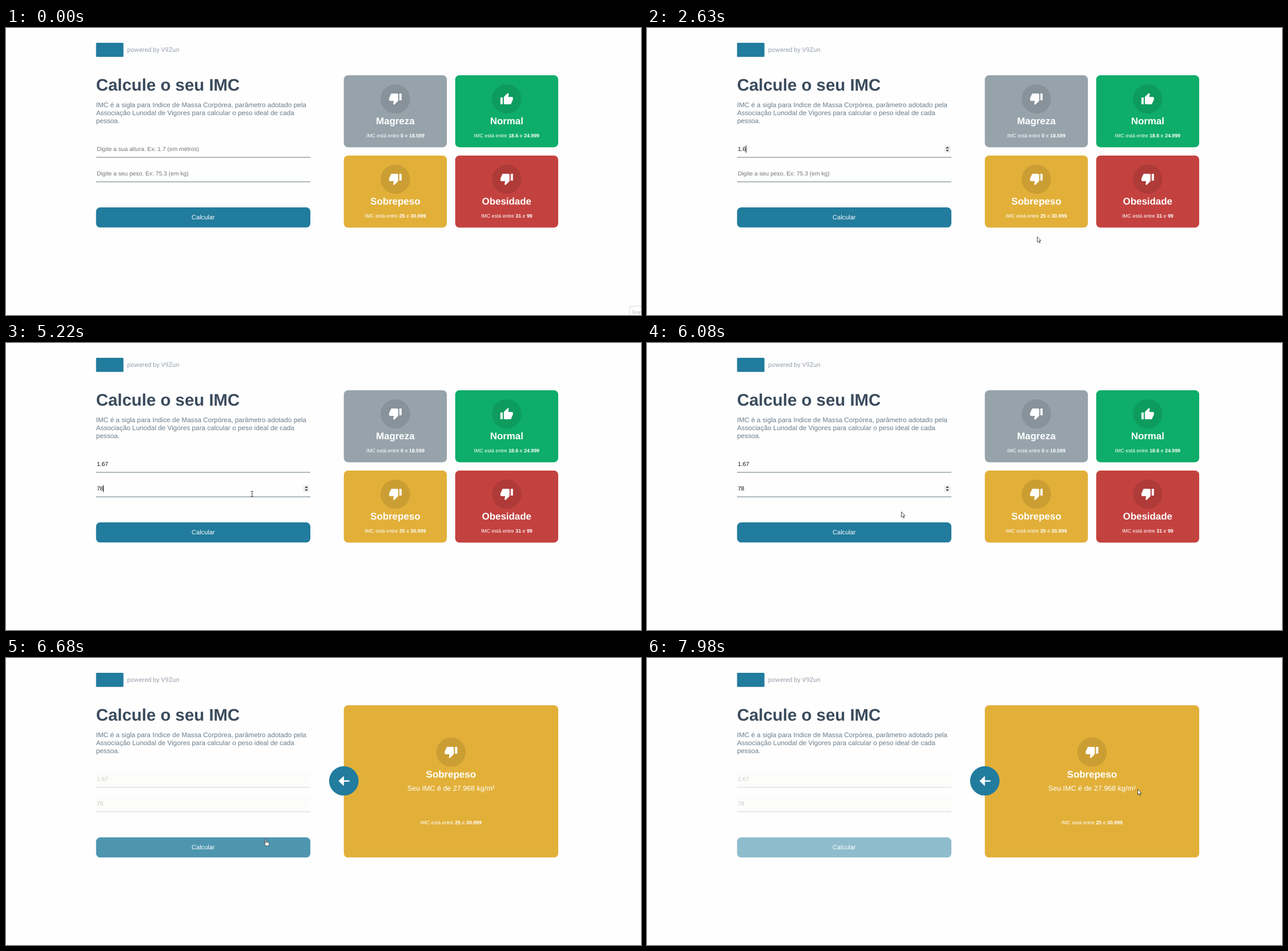
Recreate the animation shown at these times as an HTML page. Size 1112x504 px, loop 8 s.

```html
<!DOCTYPE html>
<html lang="pt">
<head>
<meta charset="utf-8">
<title>Calculadora de IMC</title>
<style>
  html, body { margin: 0; width: 100%; height: 100%; overflow: hidden; background: #fefefe; }
  svg { display: block; width: 100vw; height: 100vh; }
  text { font-family: "Liberation Sans", Arial, sans-serif; text-rendering: geometricPrecision; white-space: pre; }
  .mid { text-anchor: middle; fill: #fff; }
  .name { font-size: 16.92px; font-weight: bold; }
  .range { font-size: 8.83px; }
  .range tspan { font-weight: bold; }
  .para { font-size: 11.77px; fill: #6a7d8b; }
  .value { font-size: 10.3px; }
</style>
</head>
<body>
<svg id="stage" viewBox="0 0 1112 504"></svg>
<script>
const LOOP = 8000, TICK = 69, BLINK = 530;
const $ = id => document.getElementById(id);
const show = (id, on) => $(id).setAttribute('display', on ? 'inline' : 'none');
const set = (id, key, val) => $(id).setAttribute(key, val);

const THUMB = 'M15 3H6c-.83 0-1.54.5-1.84 1.22l-3.02 7.05c-.09.23-.14.47-.14.73v2c0 1.1.9 2 2 2h6.31' +
  'l-.95 4.57-.03.32c0 .41.17.79.44 1.06L9.83 23l6.59-6.59c.36-.36.58-.86.58-1.41V5c0-1.1-.9-2-2-2zm4 0v12h4V3h-4z';

const rangeText = (x, y, lo, hi) =>
  `<text class="mid range" x="${x}" y="${y}">IMC está entre <tspan>${lo}</tspan> e <tspan>${hi}</tspan></text>`;

const badge = (x, y, name, up) => `
  <circle cx="${x}" cy="${y}" r="25.8" fill="#000" fill-opacity=".1"/>
  <path d="${THUMB}" fill="#fff" transform="translate(${x - 12} ${y - 12.5})${up ? ' rotate(180 12 12.5)' : ''}"/>
  <text class="mid name" x="${x}" y="${y + 44.8}">${name}</text>`;

const box = (x, y, w, h, fill) => `<rect x="${x}" y="${y}" width="${w}" height="${h}" rx="7.4" fill="${fill}"/>`;

const card = (x, y, fill, name, lo, hi, up) =>
  box(x, y, 180.4, 126.5, fill) + badge(x + 90.2, y + 41.5, name, up) + rangeText(x + 90.2, y + 109, lo, hi);

const field = (i, y) => `
  <g id="field${i}">
    <rect id="shade${i}" x="157.7" y="${y - 14}" width="375.3" height="28" fill="#efefe6" fill-opacity=".4"/>
    <rect x="157.7" y="${y + 14}" width="375.3" height="1.5" fill="#96a3ab"/>
    <text id="value${i}" class="value" x="158.9" y="${y + 3.8}"></text>
    <rect id="caret${i}" y="${y - 6}" width="1" height="12.5" fill="#111"/>
    <g id="spin${i}">
      <rect x="520.3" y="${y - 6}" width="11.4" height="12.6" fill="#efefef"/>
      <path d="M523 ${y - .9}l3-3.2 3 3.2zM523 ${y + 1.5}l3 3.2 3-3.2z" fill="#444"/>
    </g>
  </g>`;

$('stage').innerHTML = `
  <rect width="1112" height="504" fill="#fefefe"/>
  <rect x="157.7" y="26" width="48" height="24.7" rx="1.5" fill="#227c9d"/>
  <text x="212" y="42.3" fill="#9aa3af" style="font:11.1px Roboto,sans-serif">powered by V9Zun</text>
  <text x="157.7" y="110" fill="#3a4b5c" font-size="29.42" font-weight="bold">Calcule o seu IMC</text>
  <text class="para" x="157.7" y="139.3">IMC é a sigla para Indice de Massa Corpórea, parâmetro adotado pela</text>
  <text class="para" x="157.7" y="152.9">Associação Lunodal de Vigores para calcular o peso ideal de cada</text>
  <text class="para" x="157.7" y="166.5">pessoa.</text>
  ${field(0, 212.4)}${field(1, 255.4)}
  <g id="button">${box(157.7, 315, 375.3, 35.3, '#227c9d')}</g>
  <text class="mid" x="345.3" y="336.2" font-size="11.03">Calcular</text>
  <g id="grid">
    ${card(591.6, 83, '#96a3ab', 'Magreza', '0', '18.599')}
    ${card(786.6, 83, '#0ead69', 'Normal', '18.6', '24.999', true)}
    ${card(591.6, 224, '#e2b039', 'Sobrepeso', '25', '30.999')}
    ${card(786.6, 224, '#c3423f', 'Obesidade', '31', '99')}
  </g>
  <g id="result">
    ${box(591.6, 83, 375.4, 267.3, '#e2b039')}
    ${badge(779.3, 165.4, 'Sobrepeso')}
    <text class="mid" x="779.3" y="233.3" font-size="12.5">Seu IMC é de 27.968 kg/m²</text>
    ${rangeText(779.3, 292, '25', '30.999')}
    <circle cx="591.6" cy="215.8" r="25.8" fill="#227c9d"/>
    <path d="M582.3 216l9.4-9v7.7h9.8v2.6h-9.8v7.7z" fill="#fff"/>
  </g>
  <g id="tip">
    <rect x="1092.5" y="488.5" width="30" height="30" fill="#fff" stroke="#dcdcdc"/>
    <text x="1096" y="502" font-size="8.8" fill="#b0b0b0">Gravar</text>
  </g>
  <g id="cursor">
    <circle id="click" cx="-.5" cy="0" r="9" fill="#e6e600" fill-opacity=".65"/>
    <path id="arrow" d="M.4.6V10l2.2-2 1.6 3.6 1.5-.7-1.6-3.5h2.8z" fill="#fff" stroke="#222" stroke-width=".8"/>
    <path id="beam" d="M-2-4.6h1.5l.5.5.5-.5H2M0-4.4v8.8M-2 4.6h1.5l.5-.5.5.5H2" fill="none" stroke="#222" stroke-width=".9"/>
    <path id="hand" d="M-1 1.2q0-1.1 1-1.1t1 1.1v4l3.7.8q1.4.4 1.3 1.7l-.5 2.2-.8 2.2H.2l-3.1-4.2q-.4-1.1.6-1.2L-1 7.8z"
      fill="#fff" stroke="#222" stroke-width=".8"/>
  </g>`;

// Pointer moves: start, steps, destination
const moves = [
  [70, 13, 482, 212], [1170, 3, 683, 366], [3090, 2, 683, 352], [3430, 5, 431, 265],
  [5790, 9, 455, 318], [6740, 10, 807, 217], [7620, 6, 859, 230]
];
const clicks = [[1040, 1110], [3900, 3960], [6610, 6680]];
const typed = [
  [[2030, '1'], [2170, '1.'], [2630, '1.6'], [2830, '1.67']],
  [[5090, '7'], [5220, '78']]
];
const hints = ['Digite a sua altura. Ex: 1.7 (em métros)', 'Digite a seu peso. Ex: 75.3 (em kg)'];
const focusSpan = [[1040, 3900], [3900, 6610]];
const within = (t, [a, b]) => t >= a && t < b;

function pointer(t) {
  let x = 1112, y = 500;
  for (const [start, steps, tx, ty] of moves) {
    if (t < start) break;
    const p = Math.min(1, (Math.floor((t - start) / TICK) + 1) / steps);
    const e = p * p * (3 - 2 * p);
    x += (tx - x) * e;
    y += (ty - y) * e;
  }
  return [x, y];
}

function drawField(i, t, hover, done) {
  const keys = typed[i].filter(k => k[0] <= t);
  const last = keys[keys.length - 1];
  const text = last ? last[1] : '';
  const focus = within(t, focusSpan[i]);
  const since = t - (last ? last[0] : focusSpan[i][0]);
  const width = [...text].reduce((w, c) => w + (c === '.' ? .278 : .556) * 10.3, 0);
  $('value' + i).textContent = text || hints[i];
  set('value' + i, 'fill', done ? '#545454' : text ? '#111' : '#757575');
  set('caret' + i, 'x', 158.6 + width);
  show('caret' + i, focus && Math.floor(since / BLINK) % 2 === 0);
  show('spin' + i, !done && (focus || hover));
  show('shade' + i, done);
  set('field' + i, 'opacity', done ? .3 : 1);
}

function render(t) {
  const [x, y] = pointer(t);
  const done = t >= 6680;
  const inCol = x > 158 && x < 533;
  const hover = [198, 241].map(top => !done && inCol && y > top && y < top + 30);
  const onButton = inCol && y > 315 && y < 350;
  const beam = hover[0] || hover[1];

  drawField(0, t, hover[0], done);
  drawField(1, t, hover[1], done);
  set('button', 'opacity', onButton ? .8 : done ? .5 : 1);
  show('grid', !done);
  show('result', done);
  show('tip', t < 70);

  show('cursor', t >= 70);
  set('cursor', 'transform', `translate(${x} ${y})`);
  show('beam', beam);
  show('hand', onButton);
  show('arrow', !beam && !onButton);
  show('click', clicks.some(c => within(t, c)));
}

const begin = performance.now();
function loop() {
  render((performance.now() - begin) % LOOP);
  requestAnimationFrame(loop);
}
loop();
</script>
</body>
</html>
```
